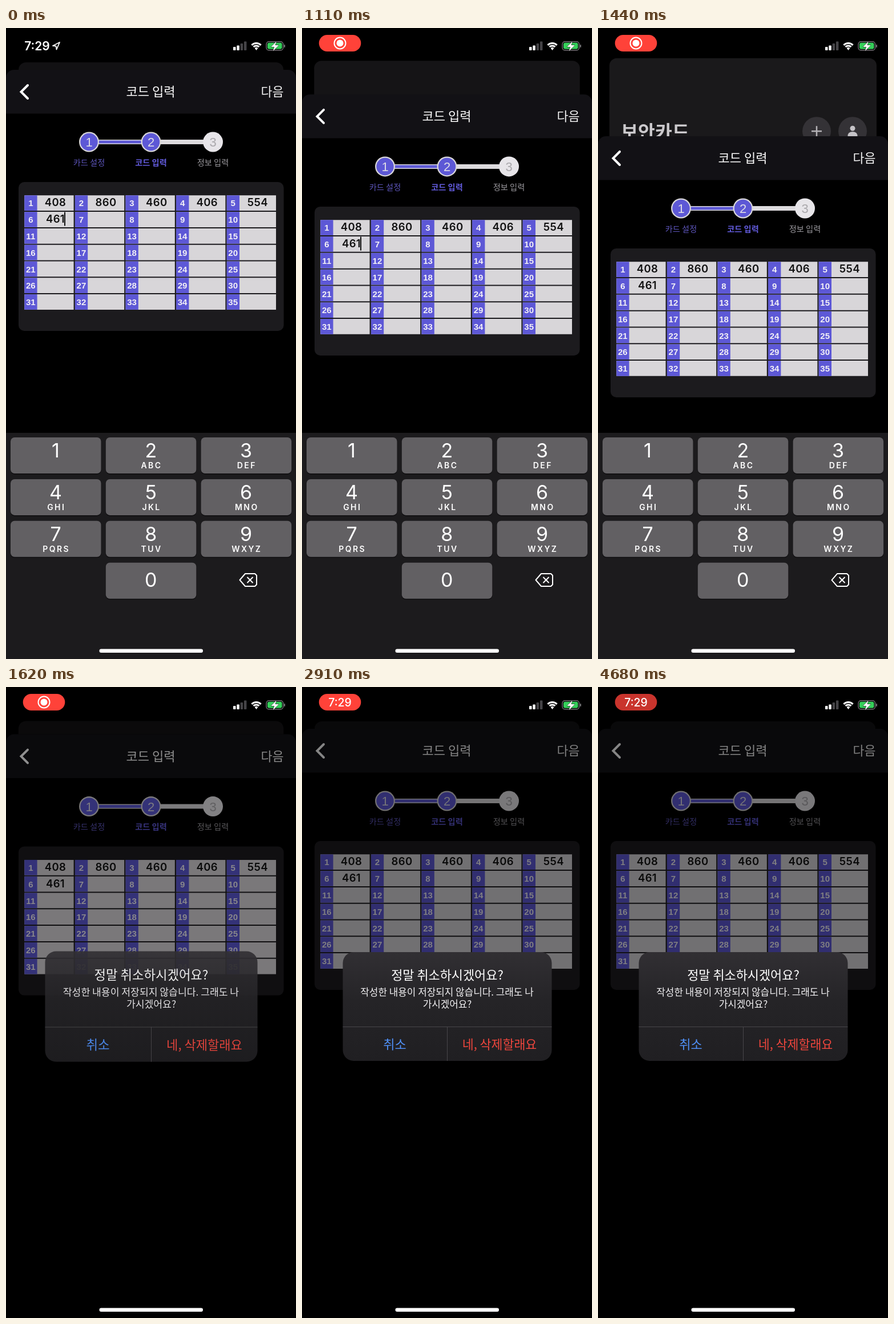
Recreate the animation shown at these times as an HTML page with a canvas. Size 508 px wide and 1102 px high, loop 4.71 s.

```html
<!DOCTYPE html>
<html lang="ko">
<head>
<meta charset="utf-8">
<style>
html, body { margin: 0; width: 100%; height: 100%; overflow: hidden; background: #000; }
canvas { display: block; width: 508px; height: 1102px; }
</style>
</head>
<body>
<canvas></canvas>
<script>
const W = 508, H = 1102, LOOP = 4710;
const DRAG = 880, RELEASE = 1440, PULL = 116, SWAP = 2250;
const canvas = document.querySelector('canvas');
const dpr = window.devicePixelRatio || 1;
canvas.width = W * dpr;
canvas.height = H * dpr;
const c = canvas.getContext('2d');

const KO = '"Noto Sans CJK KR", "Noto Sans CJK", sans-serif';
const UI = 'Inter, sans-serif';
const HELV = '"Liberation Sans", Arial, sans-serif';
const PURPLE = '#5d58d6', PALE = '#d8d6d9';

const clamp = v => Math.max(0, Math.min(1, v));
const smooth = v => { v = clamp(v); return v * v * (3 - 2 * v); };

function box(x, y, w, h, r, color) {
  c.fillStyle = color;
  c.beginPath();
  c.roundRect(x, y, w, h, r);
  c.fill();
}

function disc(x, y, r, color) {
  c.fillStyle = color;
  c.beginPath();
  c.arc(x, y, r, 0, 7);
  c.fill();
}

function line(points, width, color, closed) {
  c.strokeStyle = color;
  c.lineWidth = width;
  c.beginPath();
  points.forEach(([x, y]) => c.lineTo(x, y));
  if (closed) c.closePath();
  c.stroke();
}

// Text centred on (x, y)
function text(s, x, y, size, color, family = KO, weight = 400, spacing = 0) {
  c.font = `${weight} ${size}px ${family}`;
  c.letterSpacing = spacing + 'px';
  c.fillStyle = color;
  c.fillText(s, x + spacing / 2, y + size * (family === KO ? 0.38 : 0.36));
}

function at(x, y, scale, alpha, draw) {
  c.save();
  c.globalAlpha = alpha;
  c.translate(x, y);
  c.scale(scale, scale);
  draw();
  c.restore();
}

function backCard(dy) {
  const top = 60 - dy * 0.063, inset = 22 - dy * 0.017, k = dy / PULL;
  const tone = 18 + 8 * k;
  box(inset, top, W - 2 * inset, 400, 13, `rgb(${tone},${tone - 1},${tone + 1})`);
  const y = top + 127.5;
  text('보안카드', 100, y + 1, 32.5, '#cbc9cc', KO, 700);
  disc(383, y, 25, '#343236');
  disc(446, y, 25, '#343236');
  line([[374, y], [392, y]], 2.5, '#b5b3b7');
  line([[383, y - 9], [383, y + 9]], 2.5, '#b5b3b7');
  disc(446, y - 5, 4.5, '#c5c3c7');
  box(437.5, y + 1, 17, 9, [8, 8, 2, 2], '#c5c3c7');
}

function steps() {
  box(160, 195, 80, 8, 0, PALE);
  box(160, 196.5, 80, 5, 0, PURPLE);
  box(268, 195, 80, 8, 0, '#dddbde');
  [145.5, 254, 362.5].forEach((x, i) => {
    disc(x, 199, 17.5, i < 2 ? PALE : '#e7e5e9');
    if (i < 2) disc(x, 199, 15.2, PURPLE);
    text(i + 1, x, 199, 22, i < 2 ? '#dddbe6' : '#aaa8ac', HELV);
  });
  text('카드 설정', 145.5, 234.5, 14.2, '#5d55bb');
  text('코드 입력', 254, 234.5, 14.2, '#625bdc', KO, 700);
  text('정보 입력', 362.5, 234.5, 14.2, '#9a989d');
}

function table(caret) {
  const values = [408, 860, 460, 406, 554, 461];
  box(22, 269, 464.5, 260, 10, '#1c1b1e');
  for (let i = 0; i < 35; i++) {
    const x = 32.3 + (i % 5) * 88.6, y = 292.3 + Math.floor(i / 5) * 28.8;
    box(x, y, 86.3, 26.8, 0, PALE);
    box(x, y, 22.3, 26.8, 0, PURPLE);
    text(i + 1, x + 11, y + 13.7, 15, '#f2f0f6', HELV, 700);
    if (values[i]) text(values[i], x + 54, y + 12.2, 18.5, '#111', UI, 600, 0.4);
  }
  if (caret) box(102, 321.5, 2, 24, 0, '#111');
}

function sheet(dy, caret) {
  c.save();
  c.translate(0, dy);
  box(0, 73, W, H, [14, 14, 0, 0], '#000');
  box(0, 73, W, 76.5, [14, 14, 0, 0], '#121115');
  c.lineCap = 'round';
  line([[38, 100], [26.5, 111.5], [38, 123]], 4, '#fff');
  c.lineCap = 'butt';
  text('코드 입력', 253.5, 111, 22, '#fff', KO, 500);
  text('다음', 466.5, 111, 21.7, '#f4f4f4');
  steps();
  table(caret);
  c.restore();
}

function keyboard(offset) {
  const letters = ['', 'ABC', 'DEF', 'GHI', 'JKL', 'MNO', 'PQRS', 'TUV', 'WXYZ'];
  c.save();
  c.translate(0, offset);
  box(0, 707, W, 395, 0, '#1c1b1d');
  for (let i = 0; i < 10; i++) {
    const n = i < 9 ? i : 10;
    const x = 8 + (n % 3) * 166.8, y = 715 + Math.floor(n / 3) * 72.9;
    box(x, y + 1.5, 158.5, 63, 7, '#0e0d0f');
    box(x, y, 158.5, 63, 7, '#626063');
    text((i + 1) % 10, x + 79, y + (i < 9 ? 22.5 : 30.5), 34, '#fff', UI);
    if (letters[i]) text(letters[i], x + 79, y + 48.8, 14, '#fff', UI, 600, 2.4);
  }
  c.lineJoin = 'round';
  line([[409.5, 964], [419, 953], [436, 953], [439, 956], [439, 972], [436, 975], [419, 975]], 2, '#fff', true);
  line([[422.5, 959], [432.5, 969]], 2, '#fff');
  line([[432.5, 959], [422.5, 969]], 2, '#fff');
  c.lineJoin = 'miter';
  c.restore();
}

function alertBox(gone) {
  at(254.5, 558, 1 + 0.2 * gone, 1 - gone, () => {
    c.translate(-254.5, -558);
    const shade = c.createLinearGradient(0, 463, 0, 653);
    shade.addColorStop(0, '#312f33');
    shade.addColorStop(0.45, '#252427');
    shade.addColorStop(1, '#201f22');
    box(71.5, 463, 366, 190, 19, shade);
    box(71.5, 593, 366, 1, 0, '#48464a');
    box(254, 593, 1, 60, 0, '#48464a');
    text('정말 취소하시겠어요?', 254.5, 503, 21.9, '#fff', KO, 500);
    text('작성한 내용이 저장되지 않습니다. 그래도 나', 254, 532.5, 16.9, '#f4f3f5');
    text('가시겠어요?', 254.5, 554, 16.9, '#f4f3f5');
    text('취소', 162.5, 623.5, 22, '#4f90f8', KO, 500);
    text('네, 삭제할래요', 346, 623.5, 21.7, '#ef463d');
  });
}

function clock(t) {
  const shown = smooth((t - 90) / 180);
  if (shown < 1) at(0, 0, 1, 1 - shown, () => {
    text('7:29', 54.5, 31.5, 21, '#fff', UI, 600);
    c.lineJoin = 'round';
    line([[82, 31], [94, 25], [88.5, 37.5], [87.5, 31.5]], 1.8, '#fff', true);
    c.lineJoin = 'miter';
  });
  if (!shown) return;
  const wave = (1 - Math.cos((t - 690) / 1330 * 2 * Math.PI)) / 2;
  const glow = 0.79 + 0.21 * Math.min(1, 2 * wave);
  at(66.5, 26.5, 0.8 + 0.2 * shown, shown, () => {
    box(-36.8, -14.5, 73.6, 29, 14.5, `rgb(${255 * glow},${66 * glow},${57 * glow})`);
    if (t < SWAP) {
      c.strokeStyle = '#fff';
      c.lineWidth = 2;
      c.beginPath();
      c.arc(0, 0, 10, 0, 7);
      c.stroke();
      disc(0, 0, 6, '#fff');
    } else text('7:29', 0, 0, 19.5, '#fff', UI, 500);
  });
}

function statusIcons() {
  [6, 8.5, 12, 15.5].forEach((h, i) =>
    box(398 + i * 6.3, 39 - h, 4.5, h, 1, i < 2 ? '#fff' : '#454447'));
  c.strokeStyle = '#fff';
  c.lineWidth = 3;
  for (const r of [7, 11.5]) {
    c.beginPath();
    c.arc(438.5, 38, r, -Math.PI * 0.75, -Math.PI * 0.25);
    c.stroke();
  }
  c.fillStyle = '#fff';
  c.beginPath();
  c.moveTo(438.5, 39);
  c.arc(438.5, 38, 4, -Math.PI * 0.75, -Math.PI * 0.25);
  c.fill();
  c.strokeStyle = '#8a888c';
  c.lineWidth = 1.2;
  c.beginPath();
  c.roundRect(456, 23.8, 29.5, 15, 4.5);
  c.stroke();
  box(487, 29, 1.8, 5, 1, '#8a888c');
  box(458, 25.8, 25.5, 11, 3, '#35cf5a');
  c.fillStyle = '#fff';
  c.strokeStyle = '#000';
  c.lineWidth = 1;
  c.beginPath();
  [[474, 23], [464, 33], [470, 33], [467.5, 40.5], [478, 30], [471.5, 30]].forEach(([x, y]) => c.lineTo(x, y));
  c.closePath();
  c.stroke();
  c.fill();
}

function draw(t) {
  c.setTransform(dpr, 0, 0, dpr, 0, 0);
  c.textAlign = 'center';
  c.fillStyle = '#000';
  c.fillRect(0, 0, W, H);

  // One critically damped spring settles the sheet, the dimming and the alert
  const released = t > RELEASE;
  const s = Math.max(0, t - RELEASE) * 0.0228;
  const rest = (1 + s) * Math.exp(-s);
  const dy = PULL * (released ? rest : smooth((t - DRAG) / (RELEASE - DRAG)));

  backCard(dy);
  sheet(dy, !released);
  const slide = smooth((t - RELEASE) / 170);
  if (slide < 1) keyboard(395 * slide);
  if (released) {
    c.fillStyle = `rgba(0,0,0,${0.48 * (1 - rest)})`;
    c.fillRect(0, 0, W, H);
    alertBox(rest);
  }
  clock(t);
  statusIcons();
  box(163.5, 1084.5, 181.5, 6.5, 3.2, '#fff');
}

const start = performance.now();
function tick() {
  draw((performance.now() - start) % LOOP);
  requestAnimationFrame(tick);
}
tick();
</script>
</body>
</html>
```
